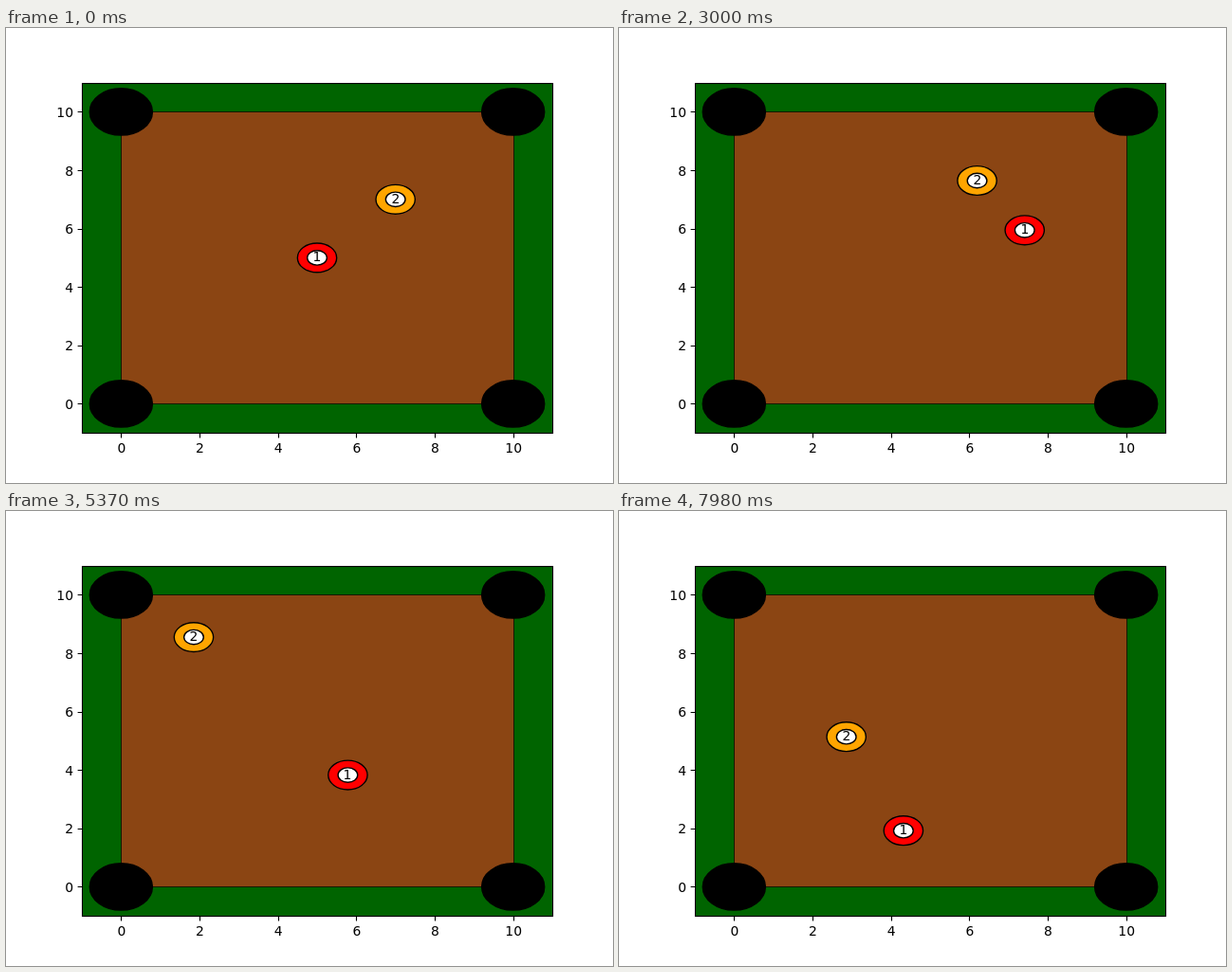
Recreate the animation shown at these times as an HTML page. Size 640 px wide and 480 px high, loop 8000 ms.

```html
<!DOCTYPE html>
<html lang="en">
<head>
<meta charset="utf-8">
<title>Two balls on a table</title>
<style>
  html, body { margin: 0; width: 100%; height: 100%; overflow: hidden; background: #fff; }
  svg { display: block; width: 640px; height: 480px; }
  text { font: 13.89px "DejaVu Sans", sans-serif; }
</style>
</head>
<body>
<svg id="stage" viewBox="0 0 640 480"></svg>
<script>
const stage = document.getElementById('stage');
const UNIT_X = 496 / 12, UNIT_Y = 369.6 / 12;
const STEP = 30, LOOP = 8000;
const FRICTION = 0.000075; // speed lost per step, in table units
const toX = x => 80 + (x + 1) * UNIT_X;
const toY = y => 427.2 - (y + 1) * UNIT_Y;
const snap = v => Math.floor(v + 0.5) + 0.5;

function add(tag, attrs, parent = stage) {
  const node = document.createElementNS('http://www.w3.org/2000/svg', tag);
  for (const key in attrs) node.setAttribute(key, attrs[key]);
  return parent.appendChild(node);
}

function label(content, x, y, anchor = 'middle') {
  const node = add('text', { x, y, 'text-anchor': anchor });
  node.textContent = content;
  return node;
}

function box(x1, y1, x2, y2, fill, lineWidth) {
  const left = snap(toX(x1)), top = snap(toY(y2));
  add('rect', {
    x: left, y: top, width: snap(toX(x2)) - left, height: snap(toY(y1)) - top,
    fill, stroke: '#000', 'stroke-width': lineWidth
  });
}

function disc(x, y, radius, fill, parent = stage) {
  add('ellipse', {
    cx: x, cy: y, rx: radius * UNIT_X, ry: radius * UNIT_Y,
    fill, stroke: '#000', 'stroke-width': 1.39
  }, parent);
}

function drawTable() {
  box(-1, -1, 11, 11, '#006400', 0);
  box(0, 0, 10, 10, '#8b4513', 0.69);
  for (const x of [0, 10]) for (const y of [0, 10]) disc(toX(x), toY(y), 0.8, '#000');
  box(-1, -1, 11, 11, 'none', 1.11);
  for (let v = 0; v <= 10; v += 2) {
    const x = toX(v), y = toY(v);
    add('path', {
      d: `M${snap(x)} 427.5v4.9M80.5 ${snap(y)}h-4.9`,
      stroke: '#000', 'stroke-width': 1.11
    });
    label(v, x + 0.5, 448);
    label(v, 71, Math.round(y + 5.5), 'end');
  }
}

// Turning points of each ball: where it starts, bounces, collides and is last seen.
const at = (step, x, y) => ({ step, x, y });
const balls = [
  { name: '1', color: '#f00', turns: [
    at(0, 5, 5), at(58.5, 9.85, 5.963), at(85.2, 7.75, 6.383), at(266, 4.32, 1.922)
  ] },
  { name: '2', color: '#ffa500', turns: [
    at(86, 7, 7), at(149.5, 3.46, 9.84), at(210.6, 0.19, 7.21), at(266, 2.864, 5.136)
  ] }
];

// Straight run between two turns, slowing evenly under friction.
function positionAt(turns, step) {
  if (step <= turns[0].step) return turns[0];
  const i = turns.findIndex(turn => turn.step >= step);
  const from = turns[i - 1], to = turns[i];
  const dx = to.x - from.x, dy = to.y - from.y, span = to.step - from.step;
  const k = (step - from.step) / span;
  const lead = FRICTION * span * span / (2 * Math.hypot(dx, dy));
  const part = k + lead * k * (1 - k);
  return { x: from.x + dx * part, y: from.y + dy * part };
}

drawTable();
for (const ball of balls) {
  ball.body = add('g', {});
  disc(0, 0, 0.5, ball.color, ball.body);
  disc(0, 0, 0.25, '#fff', ball.body);
  ball.text = label(ball.name, 0, 0);
}

function render(time) {
  const step = Math.floor((time % LOOP) / STEP);
  for (const ball of balls) {
    const place = positionAt(ball.turns, step);
    const x = toX(place.x), y = toY(place.y);
    ball.body.setAttribute('transform', `translate(${x} ${y})`);
    ball.text.setAttribute('x', Math.round(x));
    ball.text.setAttribute('y', Math.round(y + 4));
  }
}

let start;
function tick(now) {
  start ??= now;
  render(now - start);
  requestAnimationFrame(tick);
}
render(0);
requestAnimationFrame(tick);
</script>
</body>
</html>
```
